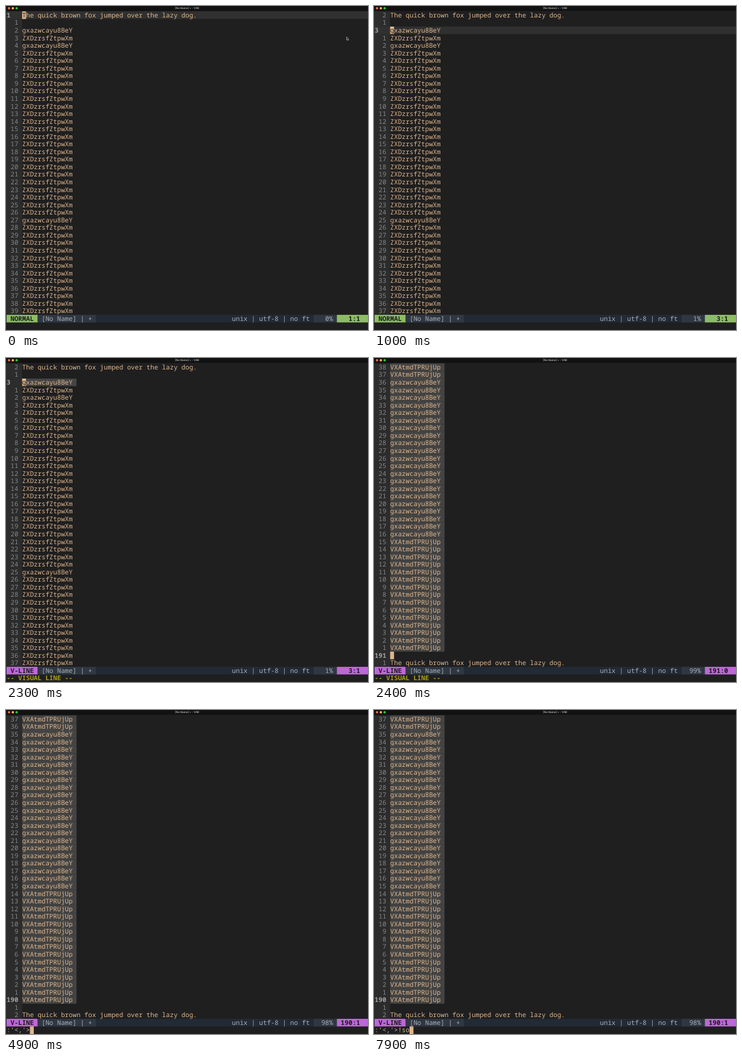
Recreate the animation shown at these times as an HTML page with a canvas. Size 600 px wide and 536 px high, loop 8000 ms.

```html
<!DOCTYPE html>
<html lang="en">
<head>
<meta charset="utf-8">
<title>Editor</title>
<style>
  html, body { margin: 0; width: 100%; height: 100%; overflow: hidden; background: #1f1f20; }
  canvas { display: block; }
</style>
</head>
<body>
<canvas id="stage" width="600" height="536"></canvas>
<script>
const ctx = document.getElementById('stage').getContext('2d');
const LOOP = 8000, CELL = 6.44, ROW = 12.55, LEFT = 1, TOP = 8.9, ROWS = 40, LAST = 192;
const C = {
  bg: '#1f1f20', gutter: '#2c2c2c', line: '#303030', select: '#444444',
  text: '#deb68c', dim: '#878787', number: '#a3a3a3', dark: '#1c1c1c',
  bar: '#222a35', box: '#2f3743', barText: '#a9b0ba',
  normal: '#8dbd62', visual: '#bf66da', message: '#aaa410'
};
const SENTENCE = 'The quick brown fox jumped over the lazy dog.';
const WORDS = { g: 'gxazwcayu8BeY', z: 'ZXDzrsfZtpwXm', v: 'VXAtmdTPRUjUp' };

// Key presses: each step overrides part of the editor state
const STEPS = [
  [0, { top: 1, cur: 1, visual: false, pct: 0, cmd: '', mouse: true }],
  [300, { cur: 2, pct: 1, mouse: false }],
  [500, { cur: 3 }],
  [1700, { visual: true }],
  [2400, { top: 153, cur: 191, pct: 99 }],
  [2800, { cur: 190, pct: 98 }],
  [4600, { cmd: ":'<,'>" }],
  [7600, { cmd: ":'<,'>!" }],
  [7800, { cmd: ":'<,'>!s" }],
  [7900, { cmd: ":'<,'>!so" }]
];

function lineText(n) {
  if (n === 1 || n === LAST) return SENTENCE;
  if (n === 2 || n === LAST - 1) return '';
  if (n < 100) return [3, 5, 28].includes(n) ? WORDS.g : WORDS.z;
  return n >= 155 && n <= 175 ? WORDS.g : WORDS.v;
}

const colX = col => LEFT + col * CELL;
const rowY = row => TOP + row * ROW;

function rect(x, y, w, h, color) {
  ctx.fillStyle = color;
  ctx.fillRect(x, y, w, h);
}

function cells(col, row, count, color) {
  rect(colX(col), rowY(row), count * CELL, ROW, color);
}

function write(str, col, row, color, weight = 500) {
  ctx.font = `${weight} 10.73px "Noto Sans Mono", "DejaVu Sans Mono", monospace`;
  ctx.textAlign = 'left';
  ctx.fillStyle = color;
  [...str].forEach((ch, i) => ctx.fillText(ch, colX(col + i), rowY(row) + 10));
}

function cursor(col, row, ch = '') {
  cells(col, row, 1, C.text);
  write(ch, col, row, C.dark);
}

function titleBar() {
  rect(0, 0, 600, 8, '#121212');
  ['#ff5f57', '#febc2e', '#28c840'].forEach((color, i) => {
    ctx.fillStyle = color;
    ctx.beginPath();
    ctx.arc(5 + i * 6.3, 3.8, 2, 0, 7);
    ctx.fill();
  });
  ctx.font = '600 4.4px Inter, sans-serif';
  ctx.textAlign = 'center';
  ctx.fillStyle = '#b4b4b4';
  ctx.fillText('[No Name] + - VIM', 300, 5.4);
}

function buffer(s) {
  rect(0, TOP, colX(4), ROWS * ROW, C.gutter);
  for (let row = 0; row < ROWS; row++) {
    const n = s.top + row, here = n === s.cur, text = lineText(n);
    if (here && !s.visual) rect(0, rowY(row), 600, ROW, C.line);
    if (s.visual && n >= 3 && n <= s.cur) cells(4, row, text.length + 1, C.select);
    if (here) write(String(n), 0, row, C.number, 700);
    else write(String(Math.abs(n - s.cur)).padStart(3), 0, row, C.dim);
    write(text, 4, row, C.text);
    if (here && !s.cmd) cursor(4, row, text[0]);
  }
}

function statusBar(s) {
  const accent = s.visual ? C.visual : C.normal;
  const place = s.cur + ':' + (lineText(s.cur) ? 1 : 0);
  rect(0, rowY(ROWS), 600, ROW, C.bar);
  cells(0, ROWS, 8, accent);
  cells(8, ROWS, 15, C.box);
  cells(79, ROWS, 6, C.box);
  cells(85, ROWS, 8, accent);
  write(s.visual ? 'V-LINE' : 'NORMAL', 1, ROWS, C.dark, 700);
  write('[No Name] | +', 9, ROWS, C.barText);
  write('unix | utf-8 | no ft', 58, ROWS, C.barText);
  write((s.pct + '%').padStart(3), 81, ROWS, C.barText);
  write(place.padStart(5), 86, ROWS, C.dark, 700);
}

function commandLine(s) {
  if (s.cmd) {
    write(s.cmd, 0, ROWS + 1, C.text);
    cursor(s.cmd.length, ROWS + 1);
  } else if (s.visual) {
    write('-- VISUAL LINE --', 0, ROWS + 1, C.message, 700);
  }
}

function pointer() {
  const arrow = new Path2D('M564.5 51 V56.3 L565.8 55.3 L566.7 57 L567.5 56.6 L566.7 55 H568.2 Z');
  ctx.fillStyle = '#111';
  ctx.strokeStyle = '#c8c8c8';
  ctx.lineWidth = 0.7;
  ctx.fill(arrow);
  ctx.stroke(arrow);
}

function draw(now) {
  const t = now % LOOP;
  const s = Object.assign({}, ...STEPS.filter(([at]) => at <= t).map(([, change]) => change));
  rect(0, 0, 600, 536, C.bg);
  titleBar();
  buffer(s);
  statusBar(s);
  commandLine(s);
  if (s.mouse) pointer();
  requestAnimationFrame(() => draw(performance.now()));
}

ctx.textRendering = 'geometricPrecision';
draw(performance.now());
</script>
</body>
</html>
```
